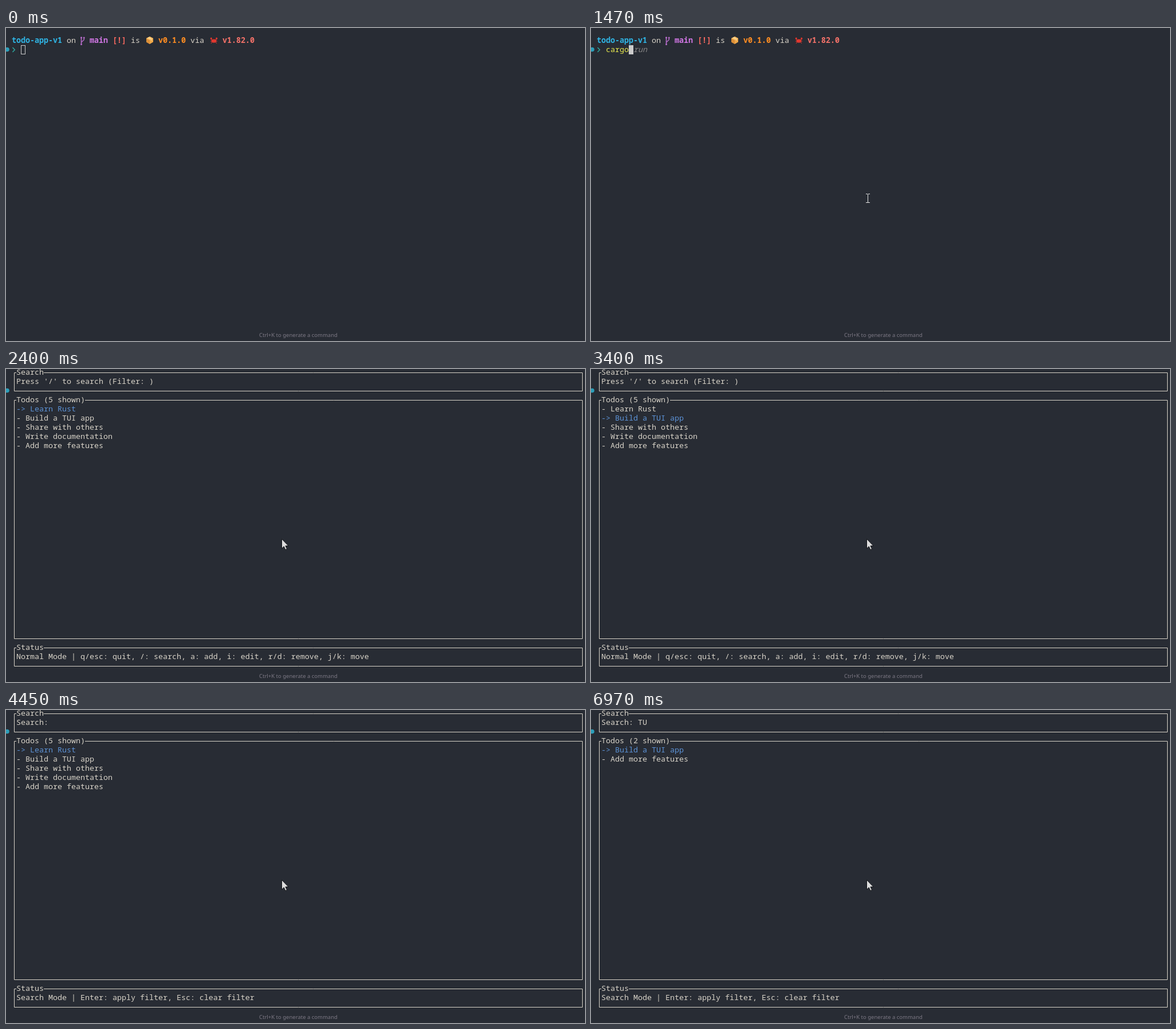
An HTML page with a canvas for the animation above (8 s loop, 1011 by 546 pixels).

```html
<!DOCTYPE html>
<html lang="en">
<meta charset="utf-8">
<title>Todo app in a terminal</title>
<style>
  html, body { margin: 0; width: 100%; height: 100%; overflow: hidden; background: #282c34; }
  canvas { display: block; }
</style>
<canvas width="1011" height="546"></canvas>
<script>
const LOOP = 8000, TICK = 200 / 3;
const BG = '#282c34', FG = '#d8d3c8', BLUE = '#5c92d6', YELLOW = '#e9ea4e';
const TODOS = ['Learn Rust', 'Build a TUI app', 'Share with others', 'Write documentation', 'Add more features'];
const COMMAND = 'cargo run';
const ctx = document.querySelector('canvas').getContext('2d');

// Value of the last [time, value] step that has been reached.
const at = (t, steps) => steps.filter(([start]) => start <= t).pop()[1];
const colX = col => 10 + 8 * col;

function text(col, row, str, color = FG, style = '') {
  ctx.font = `${style} 13.333px "Noto Sans Mono", monospace`;
  ctx.fillStyle = color;
  ctx.fillText(str, colX(col), 10 + 16 * row);
}

function shape(points, fill, stroke, width = 1) {
  ctx.beginPath();
  points.forEach(([x, y]) => ctx.lineTo(x, y));
  if (fill) {
    ctx.closePath();
    ctx.fillStyle = fill;
    ctx.fill();
  }
  if (stroke) {
    ctx.strokeStyle = stroke;
    ctx.lineWidth = width;
    ctx.stroke();
  }
}

function dot(x, y, rx, ry, color) {
  ctx.beginPath();
  ctx.ellipse(x, y, rx, ry, 0, 0, 7);
  ctx.fillStyle = color;
  ctx.fill();
}

function block(col, row) {
  ctx.fillStyle = '#cccccc';
  ctx.fillRect(colX(col), 16 * row - 2, 8, 16);
}

function branchIcon() {
  shape([[131.5, 17], [131.5, 29]], null, '#b46cc8', 1.6);
  shape([[136.2, 17], [136.2, 20.5], [131.5, 25]], null, '#b46cc8', 1.4);
  dot(131.5, 16.8, 1.6, 1.6, '#b46cc8');
  dot(136.2, 17, 1.5, 1.5, '#b46cc8');
  dot(131.5, 28.5, 1.5, 1.5, '#b46cc8');
}

function boxIcon() {
  shape([[245, 18], [251, 15], [257, 18], [257, 24.5], [251, 28], [245, 24.5]], '#f0a848');
  shape([[245, 18], [251, 21], [251, 28], [245, 24.5]], '#dc8f38');
  shape([[245, 18], [251, 15], [257, 18], [251, 21]], '#f8bf69');
  shape([[248, 16.5], [254, 19.5], [254, 22]], null, '#fae0ae', 1.2);
}

function crabIcon() {
  const red = '#e0382f';
  dot(363, 22.5, 4.2, 3.2, red);
  for (const side of [-1, 1]) {
    dot(363 + side * 4.7, 18.3, 1.5, 1.7, red);
    shape([[363 + side * 3, 22], [363 + side * 5.2, 19]], null, red, 1.2);
    shape([[363 + side * 3, 23], [363 + side * 6, 23]], null, red);
    shape([[363 + side * 2.5, 24], [363 + side * 5, 27]], null, red);
    dot(363 + side * 1.3, 19.3, 0.6, 0.8, '#40191c');
  }
}

function prompt(t) {
  text(0, 1, 'todo-app-v1', '#2fb4e4', 'bold');
  text(12, 1, 'on');
  branchIcon();
  text(17, 1, 'main', '#d076e4', 'bold');
  text(22, 1, '[!]', '#f4685f', 'bold');
  text(26, 1, 'is');
  boxIcon();
  text(32, 1, 'v0.1.0', '#ff8d22', 'bold');
  text(39, 1, 'via');
  crabIcon();
  text(46, 1, 'v1.82.0', '#f47269', 'bold');
  shape([[11.5, 34], [15.3, 38], [11.5, 42]], null, '#2ca8a0', 1.5);

  const typed = at(t, [[0, 0], [800, 1], [1000, 2], [1070, 3], [1270, 4], [1470, 5], [1670, 6], [1740, 8], [1940, 9]]);
  text(2, 2, COMMAND.slice(0, Math.min(typed, 5)), YELLOW);
  text(7, 2, COMMAND.slice(5, Math.max(typed, 5)));
  if (typed) text(2 + typed, 2, COMMAND.slice(typed), '#858484', 'italic');

  if (t < 470) {
    ctx.strokeStyle = '#cccccc';
    ctx.lineWidth = 1;
    ctx.strokeRect(26.5, 30.5, 7, 15);
  } else if (t < 2270) {
    block(2 + typed, 2);
    if (typed) text(2 + typed, 2, COMMAND.charAt(typed), BG, 'italic');
  } else {
    block(0, 3);
  }
}

function panel(title, top, bottom) {
  const y1 = 6.5 + 16 * top, y2 = 6.5 + 16 * bottom;
  shape([[18, y1], [14.5, y1], [14.5, y2], [1006.5, y2], [1006.5, y1], [colX(1 + title.length), y1]], null, FG);
  text(1, top, title);
}

function app(t) {
  const searching = t >= 4450, filtered = t >= 6970;
  const query = at(t, [[0, ''], [6570, 'T'], [6970, 'TU']]);
  const selected = at(t, [[0, 0], [3400, 1], [3530, 2], [3790, 1], [3920, 0]]);
  const items = filtered ? TODOS.filter(item => item.toLowerCase().includes(query.toLowerCase())) : TODOS;

  panel('Search', 0, 2);
  text(1, 1, searching ? `Search: ${query}` : "Press '/' to search (Filter: )");
  panel(`Todos (${items.length} shown)`, 3, 29);
  items.forEach((item, i) => {
    const active = i === selected;
    text(1, 4 + i, (active ? '-> ' : '- ') + item, active ? BLUE : FG);
  });
  panel('Status', 30, 32);
  text(1, 31, searching
    ? 'Search Mode | Enter: apply filter, Esc: clear filter'
    : 'Normal Mode | q/esc: quit, /: search, a: add, i: edit, r/d: remove, j/k: move');
}

function pointer(t) {
  if (t < 70) return;
  if (t >= 2400) {
    const arrow = [[0, 0], [0, 16.5], [3.8, 13], [6.3, 18.8], [9, 17.6], [6.5, 12], [11.5, 12], [0, 0]];
    shape(arrow.map(([x, y]) => [481.5 + x, 296.5 + y]), '#dedede', '#14161a');
    return;
  }
  const step = Math.min(6, Math.floor((t - 69) / TICK));
  const left = (1 - step / 6) ** 2;
  const x = Math.round(483 + 474 * left), y = Math.round(297 + 242 * left);
  ctx.fillStyle = '#e4e4e4';
  ctx.fillRect(x, y - 7, 1, 15);
  for (const end of [-8, 7]) {
    ctx.fillRect(x - 3, y + end, 3, 1);
    ctx.fillRect(x + 1, y + end, 3, 1);
  }
}

function draw(now) {
  const t = now % LOOP;
  ctx.fillStyle = BG;
  ctx.fillRect(0, 0, 1011, 546);
  dot(2, 37.5, 3.8, 3.8, '#2b9fba');
  (t < 2400 ? prompt : app)(t);
  ctx.font = '9.5px "Noto Sans", sans-serif';
  ctx.fillStyle = '#7d7985';
  ctx.fillText('Ctrl+K to generate a command', 442, 539);
  pointer(t);
  requestAnimationFrame(draw);
}
requestAnimationFrame(draw);
</script>
</html>
```
